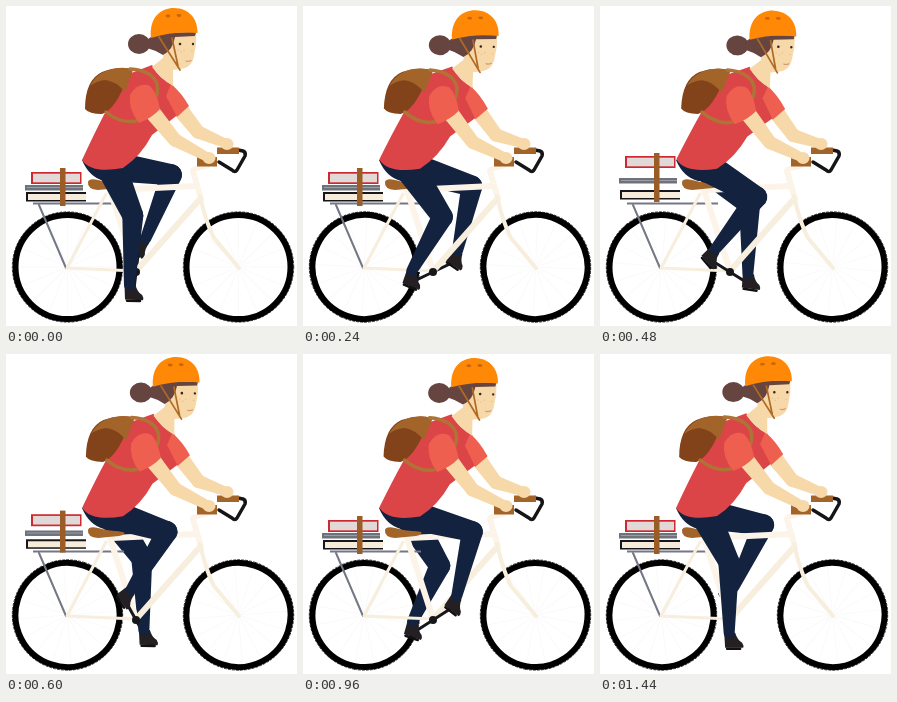
Recreate the animation shown at these times as an HTML page with a canvas. Size 291 by 320 pixels, loop 1.5 s.

```html
<!DOCTYPE html>
<html>
<head>
<meta charset="utf-8">
<style>
html, body { margin: 0; width: 100%; height: 100%; overflow: hidden; background: #fff; }
canvas { display: block; }
</style>
</head>
<body>
<canvas id="stage" width="291" height="320"></canvas>
<script>
const ctx = document.getElementById('stage').getContext('2d');
const LOOP = 1500, STEP = 60, TAU = Math.PI * 2;
const SKIN = '#f7d8a9', CREAM = '#fcf4e8', SHADE = '#f7eedd', JEANS = '#13223f', SHOE = '#231f22',
      BROWN = '#a3642a', SHIRT = '#dc4547', SLEEVE = '#ef5f50', HAIR = '#664541', STEEL = '#747785';
const BB = [130, 266], CRANK = 24, HIP = [105, 160], PIVOT = [96, 163];

function fill(d, color) {
  ctx.fillStyle = color;
  ctx.fill(new Path2D(d));
}
function line(d, color, width, cap = 'round') {
  ctx.strokeStyle = color;
  ctx.lineWidth = width;
  ctx.lineCap = cap;
  ctx.lineJoin = 'round';
  ctx.stroke(new Path2D(d));
}
function rect(x, y, w, h, color) {
  ctx.fillStyle = color;
  ctx.fillRect(x, y, w, h);
}
function dot(x, y, rx, color, ry = rx) {
  ctx.fillStyle = color;
  ctx.beginPath();
  ctx.ellipse(x, y, rx, ry, 0, 0, TAU);
  ctx.fill();
}
function placed([x, y], angle, draw) {
  ctx.save();
  ctx.translate(x, y);
  ctx.rotate(angle);
  draw();
  ctx.restore();
}
function turn([x, y], angle) {
  const dx = x - PIVOT[0], dy = y - PIVOT[1], c = Math.cos(angle), s = Math.sin(angle);
  return [PIVOT[0] + dx * c - dy * s, PIVOT[1] + dx * s + dy * c];
}

// Limb segment narrowing from radius r to radius q.
function taper([x, y], r, [u, v], q, color) {
  const a = Math.atan2(v - y, u - x), b = Math.acos((r - q) / Math.hypot(u - x, v - y));
  ctx.fillStyle = color;
  ctx.beginPath();
  ctx.arc(x, y, r, a + b, a - b + TAU);
  ctx.arc(u, v, q, a - b, a + b);
  ctx.fill();
}

function ring(radius, width, dash = []) {
  ctx.strokeStyle = '#000';
  ctx.lineWidth = width;
  ctx.setLineDash(dash);
  ctx.beginPath();
  ctx.arc(0, 0, radius, 0, TAU);
  ctx.stroke();
}
function wheel(x, spin) {
  placed([x, 261], spin, () => {
    for (let i = 0; i < 16; i++) {
      ctx.rotate(TAU / 16);
      line('M3 0H49', '#fbfafa', 1);
    }
    ring(52, 6);
    ring(55.2, 0.7, [2, 2]);
  });
}

// Phase 0 is the bottom of the stroke; the pedal then travels back and up.
function leg(phase) {
  const pedal = [BB[0] - CRANK * Math.sin(phase), BB[1] + CRANK * Math.cos(phase)];
  const tilt = 0.5 + 0.5 * Math.cos(phase - 2.9);
  const c = Math.cos(phase - 0.38), d = Math.cos(2 * phase);
  const knee = [151 - 20 * c - 5 * d, 193 + 21 * c - 4 * d];
  const ankle = [pedal[0] - 4 * Math.cos(tilt) + 11 * Math.sin(tilt),
                 pedal[1] - 4 * Math.sin(tilt) - 11 * Math.cos(tilt)];
  line(`M${BB}L${pedal}`, '#17181c', 3);
  placed(pedal, tilt, () => {
    fill('M-8 4L-9-11L2-11Q4-4 9-1Q11 2 10 4Z', SHOE);
    line('M-6 5H7', '#111', 2.5);
  });
  taper(knee, 10.5, ankle, 5.5, JEANS);
  taper(HIP, 15, knee, 10.5, JEANS);
}

function books(t) {
  const p = (t - 330) / 300;
  const hop = p > 0 && p < 1 ? 4 * p * (1 - p) : 0;
  const top = 166 - 16 * hop, middle = 179 - 7 * hop, bottom = 186 - 2 * hop;
  rect(25, top, 50.5, 12, '#ce2930');
  rect(27, top + 1.7, 47, 8.6, '#e0d9d7');
  rect(19, middle, 58, 5.5, '#6d727b');
  rect(21, middle + 2, 56, 1, '#9a9da4');
  rect(20, bottom, 60, 9.5, '#17171b');
  rect(22, bottom + 2, 58, 6, '#f6ecd9');
  rect(54, 162 - 15 * hop, 5.5, 38 + 11 * hop, '#9a5d27');
}

function frame() {
  line('M27 197.5H118', STEEL, 2, 'butt');
  line('M33 199L60 262', STEEL, 2);
  line('M61 262L100 188M61 262L130 265', SHADE, 3);
  line('M103 181L130 265', CREAM, 6);
  line('M131 264L194 193', SHADE, 6);
  line('M106 184L190 180', CREAM, 6);
  line('M187 165L195 193', CREAM, 6);
  line('M194 190Q200 217 208 232L233 262', SHADE, 4);
  line('M188 163L201 160', CREAM, 5);
  fill('M82 176Q83 172 92 174Q108 178 118 177Q120 181 113 182L92 184Q81 183 82 176Z', BROWN);
}

function handlebar() {
  line('M232 144L237 145Q240 146 239 150L231 164Q229 167 226 164L213 156', '#151518', 3.5);
  rect(191, 151, 20, 9.5, BROWN);
  rect(211, 141.5, 22, 6.5, BROWN);
}

function arm(shoulder, elbow, hand, sway) {
  const bend = turn(elbow, sway);
  taper(turn(shoulder, sway), 8, bend, 6.7, SKIN);
  taper(bend, 6.7, hand, 4.5, SKIN);
  dot(...hand, 6.5, SKIN, 6);
}

function leaning(sway, draw) {
  ctx.save();
  ctx.translate(...PIVOT);
  ctx.rotate(sway);
  ctx.translate(-PIVOT[0], -PIVOT[1]);
  draw();
  ctx.restore();
}

function head() {
  fill('M146 61L157 52L160 28L190 26L190 38L188 50Q186 62 174 63L167 64L167 80Q155 73 146 61Z', SKIN);
  dot(133, 38, 11, HAIR, 10);
  fill('M141 34L150 27L190 26L189 30L169 31Q167 44 157 49Q149 44 141 42Z', HAIR);
  line('M153 31L174 64M166 32L172 60', '#b06a24', 1.7);
  fill('M145 32C143 11 155 2 168 2C183 2 192 13 191.5 27Q168 25 145 32Z', '#ff8906');
  dot(162, 10, 2.4, '#c9640b', 1.4);
  dot(173, 9.5, 2.4, '#c9640b', 1.4);
  dot(174, 38, 1.3, '#35251f');
  dot(187, 38, 1.2, '#35251f');
  line('M180 55Q182 56 185 54.5', '#d39a78', 1.2);
  for (const [x, y] of [[172, 44], [175, 46], [178, 44], [186, 45]]) dot(x, y, 0.6, '#e5b078');
}

function torso() {
  fill('M146 59L120 69Q100 102 76 154Q85 168 117 162Q135 150 146 129L174 107L167 79Q153 73 146 59Z', SHIRT);
  fill('M165 78Q175 86 183 100L171 111L160 90Z', SLEEVE);
}

function backpack() {
  fill('M79 103Q79 74 96 66Q111 60 126 63L118 80Q108 104 96 108Q83 108 79 103Z', '#82431a');
  fill('M84 80Q92 64 112 62Q121 61 127 64L119 86Q110 75 99 74Q90 75 84 80Z', BROWN);
  line('M124 63Q146 64 151 78Q153 88 147 96M100 106Q115 118 130 115', '#ad7436', 3.5);
}

function draw(t) {
  const turned = t / LOOP * TAU, phase = turned + 0.12;
  const sway = 0.0215 * (1 - Math.cos(2 * turned));
  ctx.fillStyle = '#fff';
  ctx.fillRect(0, 0, 291, 320);
  wheel(61.5, turned * 2);
  wheel(232.5, turned * 2);
  leg(phase + Math.PI);
  frame();
  books(t);
  dot(...BB, 4, '#17181c');
  fill('M76 154Q83 171 98 175H120V150Z', JEANS);
  leg(phase);
  handlebar();
  arm([173, 102], [192, 126], [221, 138], sway);
  leaning(sway, () => { torso(); head(); backpack(); });
  arm([147, 107], [169, 134], [203, 152], sway);
  leaning(sway, () => fill('M124 89Q132 75 144 80Q151 87 154 103Q146 112 133 117Q122 103 124 89Z', SLEEVE));
}

function tick(now) {
  draw(Math.floor(now % LOOP / STEP) * STEP);
  requestAnimationFrame(tick);
}
draw(0);
requestAnimationFrame(tick);
</script>
</body>
</html>
```
